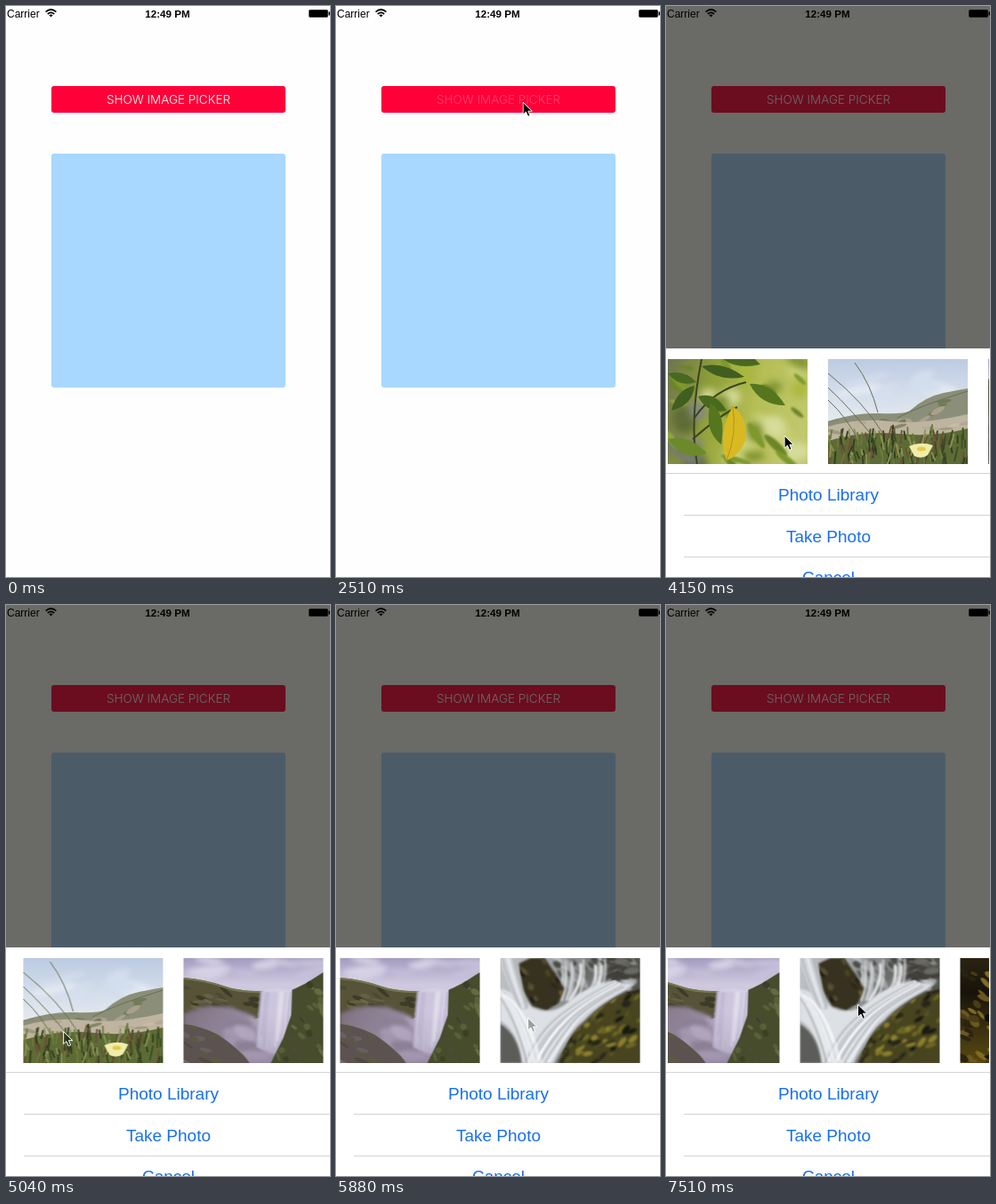
An HTML page with a canvas for the animation above (8000 ms loop, 364 by 642 pixels).

```html
<!DOCTYPE html>
<html lang="en">
<head>
<meta charset="utf-8">
<title>Image picker sheet</title>
<style>
  html, body { margin: 0; width: 100%; height: 100%; overflow: hidden; background: #fefefe; }
  #stage { position: relative; width: 364px; height: 642px; overflow: hidden; }
  #stage > * { position: absolute; left: 0; top: 0; }
  svg { display: block; font-family: "Liberation Sans", Arial, sans-serif; }
  #dim { width: 364px; height: 642px; background: rgba(22, 21, 17, .63); }
  #sheet { width: 364px; height: 257px; background: #fff; }
  #window { position: absolute; left: 2px; top: 12px; width: 361px; height: 118px; overflow: hidden; }
  #label { font: 300 13.5px Inter, "Liberation Sans", sans-serif; }
</style>
</head>
<body>
<div id="stage">
  <svg width="364" height="642">
    <rect x="51" y="90" width="263" height="30" rx="3" fill="#ff0039"/>
    <text id="label" x="182.5" y="110" text-anchor="middle" fill="#fff">SHOW IMAGE PICKER</text>
    <rect x="51" y="166" width="263" height="263" rx="3" fill="#a8d7ff"/>
  </svg>
  <div id="dim"></div>
  <svg width="364" height="20">
    <text x="1" y="12.5" font-size="12">Carrier</text>
    <text x="181.5" y="12.5" font-size="11.6" font-weight="bold" text-anchor="middle">12:49 PM</text>
    <g fill="none" stroke="#000" stroke-width="1.7">
      <path d="M44.6 6.6Q50.5 1.4 56.4 6.6M46.8 9Q50.5 5.7 54.2 9"/>
      <path d="M48.4 10.2Q50.5 8.6 52.6 10.2L50.5 12.4Z" fill="#000" stroke="none"/>
    </g>
    <rect x="340.5" y="4.5" width="21" height="8" rx="1" stroke="#000" stroke-width=".5"/>
    <rect x="362.5" y="6.5" width="1.5" height="4"/>
  </svg>
  <div id="sheet">
    <div id="window"><canvas id="strip" width="900" height="118"></canvas></div>
    <svg width="364" height="257" style="position:absolute;left:0;top:0">
      <path d="M0 140.5H364M20 187.5H364M20 234.5H364" stroke="#d3d3d5"/>
      <g font-size="19" text-anchor="middle" fill="#176ff2">
        <text x="182.5" y="170.5">Photo Library</text>
        <text x="182.5" y="217.5">Take Photo</text>
        <text x="182.5" y="263.5">Cancel</text>
      </g>
    </svg>
  </div>
  <svg id="cursor" width="14" height="20">
    <path id="arrow" d="M.6 1.2V15.2L3.9 12.1 6.2 17.3 8.6 16.3 6.4 11.2H10.8Z" stroke="#fff"/>
  </svg>
</div>
<script>
const $ = id => document.getElementById(id);
const g = $('strip').getContext('2d');

let seed = 7;
const rnd = (a = 0, b = 1) => {
  seed = (seed * 16807) % 2147483647;
  return a + (b - a) * seed / 2147483647;
};
const pick = list => list[Math.floor(rnd(0, list.length))];
const blur = px => { g.filter = px ? `blur(${px}px)` : 'none'; };
const fill = (color, d) => { g.fillStyle = color; g.fill(new Path2D(d)); };
const line = (color, width, d) => {
  g.strokeStyle = color;
  g.lineWidth = width;
  g.stroke(new Path2D(d));
};
function ramp(colors, x = 0, y = 118) {
  const r = g.createLinearGradient(0, 0, x, y);
  colors.forEach((c, i) => r.addColorStop(i / (colors.length - 1), c));
  return r;
}
const wash = (colors, x, y) => fill(ramp(colors, x, y), 'M0 0H157V118H0Z');
function blob(color, x, y, rx, ry, turn = 0) {
  g.fillStyle = color;
  g.beginPath();
  g.ellipse(x, y, rx, ry, turn, 0, 7);
  g.fill();
}
// Scatter patches over a rectangle
function scatter(n, colors, x0, y0, x1, y1, rx, ry, turn = 0) {
  for (let i = 0; i < n; i++)
    blob(pick(colors), rnd(x0, x1), rnd(y0, y1), rx * rnd(.5, 1.2), ry * rnd(.5, 1.2), turn + rnd(-.4, .4));
}
// Fill an outline and texture only its inside
function textured(base, d, n, colors, rx, ry, turn) {
  g.save();
  fill(base, d);
  g.clip(new Path2D(d));
  scatter(n, colors, 0, 0, 157, 118, rx, ry, turn);
  g.restore();
}

function leaves() {
  wash(['#6d7350', '#8f9f38', '#b5bf55', '#c0c76c'], 157, 40);
  blur(4);
  scatter(22, ['#a9b93c', '#cbd27d', '#7d9130', '#d6dc9a'], 40, 0, 157, 118, 14, 10);
  scatter(9, ['#858882', '#74796a', '#5d6b38'], 0, 50, 35, 118, 12, 10);
  blur(1);
  scatter(16, ['#6b8526', '#7d982d', '#92a738'], 0, 0, 157, 118, 15, 4, .6);
  blur(.5);
  line('#3a4420', 2, 'M33 118Q24 70 38 0M30 66Q52 34 88 26M28 90Q60 62 78 54');
  fill('#405e20', 'M38 8Q62 2 86 20Q58 26 38 8ZM30 30Q10 34 4 58Q28 52 30 30Z');
  fill('#49691f', 'M34 42Q54 36 66 58Q44 62 34 42ZM62 0Q78 12 104 6L98 0ZM0 16Q20 12 32 26Q12 32 0 16Z');
  fill('#55751f', 'M48 50Q66 60 60 96Q40 80 48 50ZM92 28Q116 26 132 52Q104 52 92 28Z');
  fill('#6c8a2a', 'M0 90Q24 84 44 106Q18 116 0 90Z');
  fill('#d9b922', 'M73 53Q91 66 87 92Q80 109 66 114Q55 84 73 53Z');
  line('#b0931a', 1, 'M73 53Q78 84 66 114');
}

function dunes() {
  wash(['#bccbe2', '#d5deeb', '#eaedf0', '#e6e6e4']);
  blur(3);
  scatter(8, ['#e4eaf3', '#d3deed'], 30, 15, 140, 45, 24, 7);
  blur(.6);
  textured('#8b8f79', 'M0 70Q30 60 58 61T92 58Q110 42 130 38T157 33V118H0Z',
    90, ['#858b70', '#99977f', '#707b58', '#a9a18b'], 8, 3, -.2);
  textured('#beb4a0', 'M0 76Q36 66 70 70T157 62V100H0Z',
    70, ['#a19a83', '#c5bba7', '#858866', '#b3a993'], 9, 2);
  fill('#5d6b35', 'M0 92Q40 80 80 84T157 78V118H0Z');
  blur(.4);
  for (let i = 0; i < 160; i++) {
    const x = rnd(0, 157), y = rnd(88, 124);
    line(pick(['#3d4c24', '#6e7a3a', '#8b9558', '#6b5038', '#2f3d1f']), 1.8,
      `M${x} ${y}L${x + rnd(-5, 5)} ${y - rnd(8, 17)}`);
  }
  line('#657050', 1, 'M0 16Q40 48 62 84M0 32Q28 58 54 92M0 46Q22 66 34 92M30 4Q48 28 56 60M78 66Q104 52 157 36');
  fill('#f0edaa', 'M91 98Q104 92 118 97L112 108Q105 113 97 109Z');
  blob('#e4cd4d', 105, 101, 5, 2.5);
}

function waterfall() {
  wash(['#a49cc0', '#d0cae0', '#c3bcd2', '#8f849a'], 0, 90);
  blur(3);
  scatter(9, ['#dcd7e9', '#b4aed0', '#c8c2dc'], 0, 2, 157, 26, 25, 4);
  blur(.6);
  textured('#565338', 'M0 22Q24 24 44 31T90 37L86 66 70 74 0 90Z',
    130, ['#4a4a30', '#646142', '#3b3b28', '#6f6651'], 8, 2.5, .35);
  line('#77784f', 2, 'M0 23Q24 25 44 32T88 38');
  blur(2);
  fill(ramp(['#6c6268', '#877a8b', '#9a8ea6'], 90, 60), 'M0 62Q34 48 62 58T94 84L104 118H0Z');
  scatter(16, ['#a397b0', '#8d8095', '#b0a5bd'], 50, 72, 106, 112, 16, 6, .3);
  blur(1);
  fill(ramp(['#d6d0e5', '#d9d4e7', '#ada3be']), 'M87 37Q104 32 122 36L120 70 108 106Q94 108 82 100Z');
  for (let x = 86; x < 120; x += 2.5)
    line(pick(['#eeeaf5', '#c4bcd6', '#b0a7c6', '#dcd7e9']), 1.6, `M${x + 2} 38Q${x - 1} 66 ${x - 3} ${rnd(82, 104)}`);
  blur(.6);
  textured('#474c2d', 'M157 16L138 28 122 36 121 64 112 90 98 118H157Z',
    110, ['#3a3f27', '#58603a', '#4d4a35', '#656a42'], 6, 3, .9);
  textured('#5c5350', 'M0 74Q30 78 50 94T74 118H0Z',
    90, ['#4e4a3c', '#685e63', '#5b5a40', '#766b72'], 9, 2.5, .45);
}

function rapids() {
  wash(['#c0c3c7', '#a6a9ac', '#77797a', '#54544f'], 150, 30);
  blur(.8);
  scatter(60, ['#6c6d6a', '#8b8d8e', '#4c4b45', '#b9bdc2', '#a2a4a6'], 60, 0, 150, 34, 8, 3.5, .7);
  scatter(26, ['#55544c', '#41403a', '#6a6a64'], 112, 0, 157, 22, 9, 4, -.3);
  for (let i = 0; i < 14; i++) {
    const x = rnd(64, 122);
    line(pick(['#dfe2e6', '#f2f4f6', '#c6cacf']), 2, `M${x} ${rnd(0, 14)}Q${x + 3} 26 ${x - rnd(4, 16)} 48`);
  }
  textured('#37321f', 'M21 6L34 0H50L62 18 72 34 66 50 52 59 36 54 25 36Z',
    110, ['#4d4522', '#1e1c15', '#6d632c', '#29261a', '#575036'], 5, 3, .8);
  textured('#48441f', 'M157 34Q128 42 106 62L80 86 64 118H157Z',
    200, ['#6f6825', '#26251a', '#8c802e', '#47491f', '#191913', '#595523'], 6, 3, -.6);
  blur(1.2);
  fill('#dde0e4', 'M0 34Q22 40 36 56Q58 66 78 48T128 26L150 30Q112 50 94 70Q70 88 60 118H24Q20 82 0 70Z');
  fill('#5c5d59', 'M0 74Q20 86 24 118H0Z');
  for (let i = 0; i < 30; i++) {
    const d = rnd(-8, 8);
    line(pick(['#fbfcfe', '#eef1f4', '#a5a9ae', '#c4c8cd']), 1.8,
      `M${136 + d} ${30 + d / 2}Q96 ${50 + d} ${76 + d} ${70 + d}T${42 + d * 2} 118`);
    line(pick(['#f7f9fb', '#9a9ea2', '#dfe2e6']), 1.8, `M${d - 6} ${34 + d}Q${20 + d} 50 ${38 + d} 118`);
    line(pick(['#f4f6f8', '#b6babe', '#d5d8dc']), 1.8, `M${8 + d} 0Q${14 + d} 24 ${26 + d / 2} 56`);
  }
}

function rocks() {
  wash(['#2b2412', '#17130a', '#3a3010', '#59480f']);
  blur(.6);
  scatter(160, ['#4a3c17', '#0f0d07', '#6b5820', '#2a2311', '#1c170c', '#7f6a26'], 0, 0, 157, 118, 7, 3.5, .5);
}

[leaves, dunes, waterfall, rapids, rocks].forEach((paint, i) => {
  g.save();
  g.translate(i * 180, 0);
  g.clip(new Path2D('M0 0H157V118H0Z'));
  paint();
  g.restore();
});

// The screen refreshes in runs: first time, last time, number of steps
const runs = [[1190, 2070, 7], [2510, 2950, 4], [3250, 4150, 7], [4300, 5330, 8],
  [5470, 5880, 4], [6020, 6460, 4], [6610, 6760, 2], [7510, 7510, 1]];
function held(t) {
  let last = 0;
  for (const [a, b, n] of runs) {
    if (t < a) break;
    const step = (b - a) / (n - 1) || 1;
    last = a + step * Math.min(n - 1, Math.floor((t - a) / step + 1e-6));
  }
  return last;
}

// Finger drag, then exponential deceleration
function scroll(t) {
  if (t < 4300) return 0;
  if (t < 4888) return 78.5 * ((t - 4250) / 639) ** 3;
  return 398 - 127.5 * Math.exp((5330 - Math.min(t, 6760)) / 480);
}

const path = [[1190, 328, 596], [2070, 209.5, 107], [3150, 209.5, 107], [4150, 132.5, 482],
  [4300, 132, 482], [4888, 53.5, 480], [5330, 94, 474], [5880, 215, 463], [6170, 215, 448]];
function pointer(t) {
  const i = path.findIndex(k => k[0] > t);
  if (i < 0) return path[path.length - 1].slice(1);
  const [a, x0, y0] = path[Math.max(0, i - 1)], [b, x1, y1] = path[i];
  const u = Math.max(0, (t - a) / (b - a)), e = u * u * (3 - 2 * u);
  const x = t > 4300 && t < 4888 ? 132 - scroll(t) : x0 + (x1 - x0) * e;
  return [x, y0 + (y1 - y0) * e];
}

function draw(now) {
  const t = held(now % 8000);
  const open = 1 - (1 - Math.min(1, Math.max(0, (t - 2600) / 200))) ** 3;
  $('label').style.opacity = t >= 2510 && t < 2650 ? .25 : 1;
  $('dim').style.opacity = open;
  $('sheet').style.transform = `translateY(${642 - 257 * open}px)`;
  $('strip').style.transform = `translateX(${-scroll(t)}px)`;
  const [x, y] = pointer(t);
  $('cursor').style.transform = `translate(${x}px,${y}px)`;
  $('cursor').style.visibility = t < 1190 ? 'hidden' : 'visible';
  const faint = (t > 2650 && t < 2950) || (t >= 4300 && t < 7510);
  $('arrow').style.fillOpacity = faint ? .3 : 1;
}

const start = performance.now();
(function tick() {
  draw(performance.now() - start);
  requestAnimationFrame(tick);
})();
</script>
</body>
</html>
```
